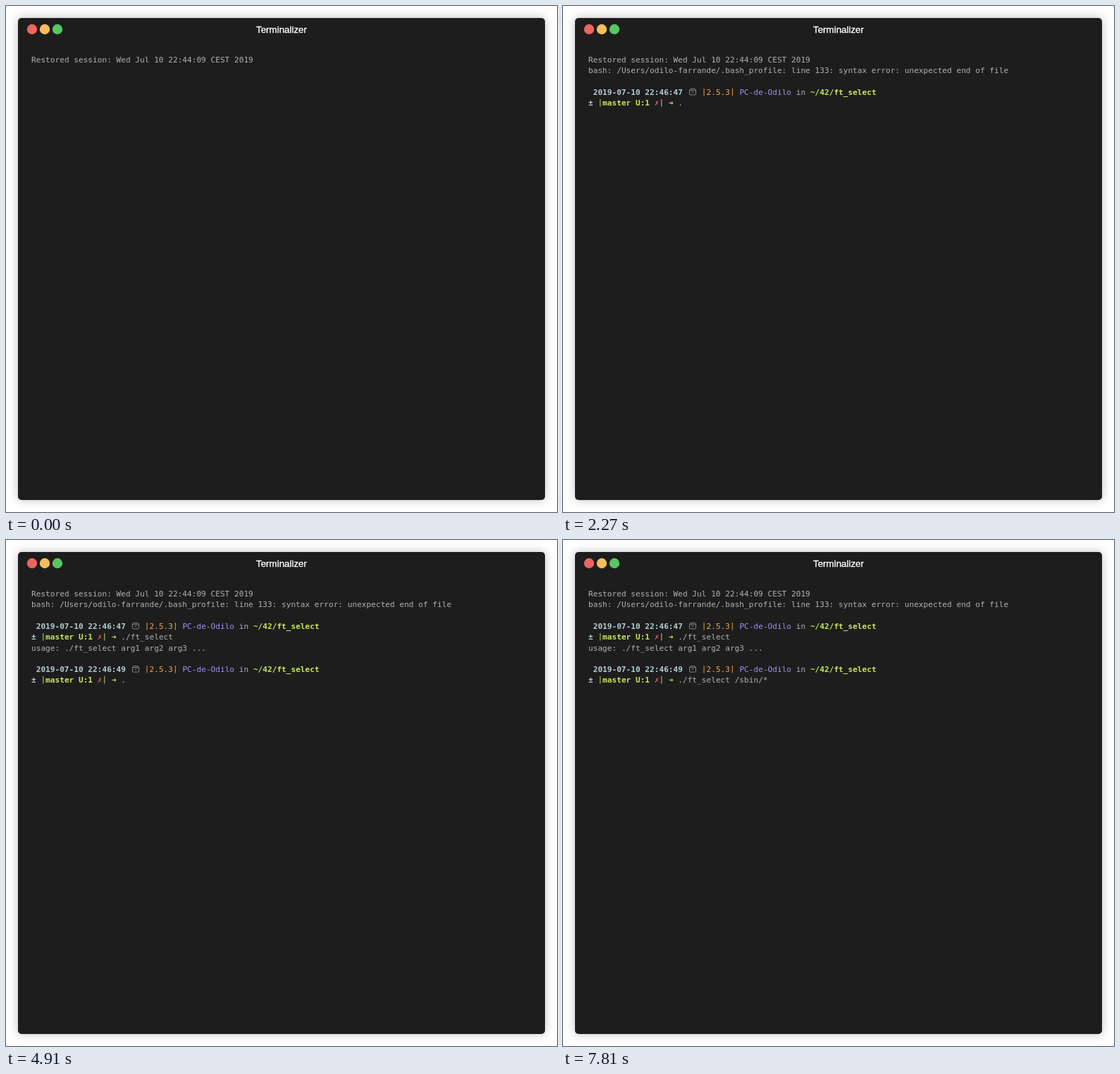
Write an HTML page that moves like this. It is 782 px wide and 717 px high and loops after 8000 ms.

```html
<!DOCTYPE html>
<html lang="en">
<head>
<meta charset="utf-8">
<title>Terminal session</title>
<style>
  html, body { margin: 0; width: 100%; height: 100%; overflow: hidden; background: #fff; }
  .window {
    position: absolute; left: 17px; top: 17px; width: 748px; height: 683px;
    border-radius: 5px; background: #1d1d1d;
    box-shadow: 0 0 14px rgba(0, 0, 0, .26);
  }
  svg { position: absolute; left: 0; top: 0; display: block; }
  .title {
    font: 13.35px "Liberation Sans", Arial, sans-serif;
    fill: #fff; stroke: #fff; stroke-width: .35px; text-anchor: middle;
  }
  #screen {
    font: 11.13px "DejaVu Sans Mono", monospace;
    font-variant-ligatures: none;
    fill: #b2b2b2;
  }
  .bold { font-weight: 700; }
  .date { fill: #b7cdd0; }
  .orange { fill: #f2a549; }
  .purple { fill: #a48ff2; }
  .orange, .purple { stroke: currentColor; stroke-width: 0; }
  .green { fill: #c8e65c; }
  .red { fill: #ef5460; }
  .icon { fill: none; stroke: #858585; stroke-width: 1; }
</style>
</head>
<body>
<div class="window"></div>
<svg width="782" height="717" viewBox="0 0 782 717">
  <circle cx="37" cy="33" r="7.2" fill="#ee6460"/>
  <circle cx="55" cy="33" r="7.2" fill="#f5bd5c"/>
  <circle cx="73" cy="33" r="7.2" fill="#58c663"/>
  <text class="title" x="391" y="38">Terminalizer</text>
  <g id="screen"></g>
</svg>
<script>
const LOOP = 8000, LEFT = 36, COL = 6.7, BASE = 80, ROW = 15.3;
const screen = document.getElementById("screen");
const groups = [], typed = [];

function add(parent, tag, attrs, content = "") {
  const el = document.createElementNS("http://www.w3.org/2000/svg", tag);
  for (const key in attrs) el.setAttribute(key, attrs[key]);
  el.textContent = content;
  parent.append(el);
  return el;
}

// Everything in a group appears at time `at`.
function group(at) {
  const el = add(screen, "g", {});
  groups.push({ el, at });
  return el;
}

function put(parent, row, col, content, cls = "") {
  const lift = content === "|" ? 1.3 : 0;
  return add(parent, "text", {
    x: LEFT + col * COL, y: BASE + row * ROW - lift, class: cls
  }, content);
}

function prompt(at, row, clock, steps) {
  const g = group(at);
  const next = row + 1;
  put(g, row, 1, "2019-07-10 " + clock, "bold date");
  add(g, "path", {
    class: "icon",
    transform: `translate(179.5 ${BASE + row * ROW - 9})`,
    d: "M1.5 .5h6l1.5 2v5.5q0 1-1 1h-7q-1 0-1-1v-5.5zM0 2.5h9M2.8 4.5q1.7 2 3.4 0"
  });
  put(g, row, 24, "|", "orange");
  put(g, row, 25, "2.5.3", "orange");
  put(g, row, 30, "|", "orange");
  put(g, row, 32, "PC-de-Odilo", "purple");
  put(g, row, 44, "in");
  put(g, row, 47, "~/42/ft_select", "bold green");

  put(g, next, 0, "±", "bold date");
  put(g, next, 2, "|", "green");
  put(g, next, 3, "master U:1", "bold green");
  put(g, next, 14, "✗", "bold red");
  put(g, next, 15, "|", "green");
  put(g, next, 17, "➜", "green");
  typed.push({ el: put(g, next, 19, ""), steps });
}

put(group(0), 0, 0, "Restored session: Wed Jul 10 22:44:09 CEST 2019");
put(group(910), 1, 0,
  "bash: /Users/odilo-farrande/.bash_profile: line 133: syntax error: unexpected end of file");
prompt(1330, 3, "22:46:47", [
  [2270, "."], [2440, "./"], [2820, "./f"], [2890, "./ft_select"]
]);
put(group(3340), 5, 0, "usage: ./ft_select arg1 arg2 arg3 ...");
prompt(3730, 7, "22:46:49", [
  [4910, "."], [5080, "./"], [5410, "./f"], [5480, "./ft_select"],
  [6400, "./ft_select /"], [6830, "./ft_select /s"],
  [7010, "./ft_select /sbin/"], [7810, "./ft_select /sbin/*"]
]);

function draw(t) {
  for (const { el, at } of groups) el.style.display = t >= at ? "" : "none";
  for (const { el, steps } of typed) {
    let line = "";
    for (const [at, content] of steps) if (t >= at) line = content;
    if (el.textContent !== line) el.textContent = line;
  }
}

const start = performance.now();
function tick() {
  draw((performance.now() - start) % LOOP);
  requestAnimationFrame(tick);
}
tick();
</script>
</body>
</html>
```
